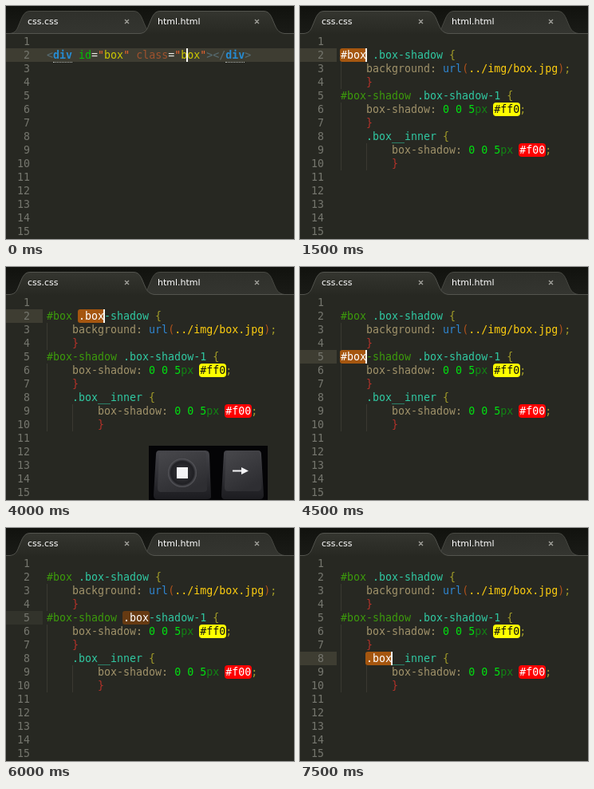
Animation of 361 by 292 pixels, one loop 8000 ms. Source, as an HTML page:

```html
<!DOCTYPE html>
<html lang="en">
<head>
<meta charset="utf-8">
<title>Multiple selection in an editor</title>
<style>
html, body { margin: 0; width: 100%; height: 100%; overflow: hidden; background: #272822; }
#stage { position: absolute; left: 0; top: 0; width: 361px; height: 292px; overflow: hidden; background: #272822; }
#stage > *, .guide, .line { position: absolute; }
svg { left: 0; top: 0; }
pre, #sel { font: 13.3px/17px "DejaVu Sans Mono", monospace; }
pre { margin: 0; top: 36px; }
#nums { left: 14px; color: #75766e; }
#html, #css { left: 51px; }
.label { top: 12px; font: 11px/15px "DejaVu Sans", sans-serif; color: #fff; }
#row, #sel, #caret { height: 17px; }
#row { left: 0; }
#sel { width: 34px; border-radius: 3px; color: #fff; text-indent: 1px; }
#caret { width: 2px; background: #f8f8f2; }
.guide { width: 1px; background: #3a3931; }
b { color: #268bd2; }
.line { height: 0; width: 24px; top: 70px; border-top: 1px dotted #b4b8b4; }
.tag { color: #586e75; }
.attr { color: #00c400; }
.cls { color: #a0522d; }
.eq { color: #e8e8e2; }
.q { color: #f0642d; }
.str { color: #cbc800; }
.id { color: #3c9a0c; }
.dot { color: #30c8a2; }
.open { color: #a09a28; }
.shut { color: #b5322a; }
.prop { color: #a0926a; }
.fn { color: #2f86d2; }
.par { color: #b0521c; }
.path { color: #fccc10; }
.num { color: #00e010; }
.unit { color: #128414; }
.yel, .red { border-radius: 4px; padding: 1px; margin: 0 -1px; }
.yel { background: #ff0; color: #111; }
.red { background: #f00; color: #fff; }
</style>
</head>
<body>
<div id="stage">
  <svg width="361" height="36">
    <defs>
      <linearGradient id="bar" x2="0" y2="1"><stop stop-color="#11120e"/><stop offset="1" stop-color="#1a1b17"/></linearGradient>
      <linearGradient id="off" x2="0" y2="1"><stop stop-color="#2f302b"/><stop offset="1" stop-color="#343530"/></linearGradient>
      <linearGradient id="on" x2="0" y2="1"><stop stop-color="#34352f"/><stop offset="1" stop-color="#272822"/></linearGradient>
    </defs>
    <rect width="361" height="35" fill="url(#bar)"/>
    <g id="tabs"></g>
  </svg>
  <div class="label" style="left:27px">css.css</div>
  <div class="label" style="left:190px">html.html</div>
  <svg width="361" height="36"><path d="M149 17l5 5m0-5l-5 5M312 17l5 5m0-5l-5 5" stroke="#a2a29c" stroke-width="1.3"/></svg>
  <div id="row"></div>
  <pre id="nums"></pre>
  <div id="guides"></div>
  <pre id="html"></pre>
  <div id="lines"></div>
  <pre id="css"></pre>
  <div id="sel"></div>
  <div id="caret"></div>
  <svg id="keys" width="361" height="292">
    <defs>
      <linearGradient id="side" x2="0" y2="1"><stop stop-color="#45454a"/><stop offset="1" stop-color="#1c1c20"/></linearGradient>
      <linearGradient id="face" x2=".5" y2="1"><stop stop-color="#48484c"/><stop offset="1" stop-color="#2e2e32"/></linearGradient>
      <radialGradient id="dish"><stop stop-color="#3a3a3e"/><stop offset=".8" stop-color="#202024"/><stop offset="1" stop-color="#59595e"/></radialGradient>
    </defs>
    <rect x="179" y="224" width="149" height="68" fill="#040406"/>
    <path d="M192 230H250Q255 230 255 236L257 288Q257 291 252 291H189Q185 291 185 286L188 235Q188 230 192 230Z" fill="url(#side)"/>
    <path d="M195 232H248Q251 232 251 236L252 278Q252 282 247 282H194Q190 282 190 277L192 236Q192 232 195 232Z" fill="url(#face)"/>
    <circle cx="221" cy="258" r="18" fill="url(#dish)"/>
    <rect x="214" y="251" width="14" height="14" fill="#f4f4f6"/>
    <path d="M277 230H316Q320 230 320 235L323 286Q323 291 318 291H274Q270 291 270 286L273 234Q273 230 277 230Z" fill="url(#side)"/>
    <path d="M279 231H315Q318 231 318 235L320 276Q320 281 315 281H278Q274 281 274 276L276 235Q276 231 279 231Z" fill="url(#face)"/>
    <path d="M284 254.500H295V251L304 255.500L295 260V256.500H284Z" fill="#f4f4f6"/>
  </svg>
</div>
<script>
const $ = id => document.getElementById(id);
const LEFT = 51, TOP = 36, CH = 8, ROW = 17, LOOP = 8000;
const colX = n => LEFT + n * CH;
const rowTop = n => TOP + (n - 1) * ROW;
const esc = s => s.replace(/&/g, "&amp;").replace(/</g, "&lt;");

// A line is an indent followed by pairs of class and text.
const line = ([indent, ...parts]) => {
  let out = " ".repeat(indent);
  for (let i = 0; i < parts.length; i += 2)
    out += parts[i] === "b" ? `<b>${parts[i + 1]}</b>` : `<span class="${parts[i]}">${esc(parts[i + 1])}</span>`;
  return out;
};
// Code begins on the second row.
const fill = (id, lines) => {
  $(id).innerHTML = lines.map(line).join("\n");
  $(id).style.top = rowTop(2) + "px";
};
const shadow = (indent, style, color) => [indent, "prop", "box-shadow: ", "num", "0 0 5", "unit", "px ", style, color, "open", ";"];

fill("html", [[0, "tag", "<", "b", "div", "attr", " id", "eq", "=", "q", '"', "str", "box", "q", '"',
  "cls", " class", "eq", "=", "q", '"', "str", "box", "q", '"', "tag", "></", "b", "div", "tag", ">"]]);
fill("css", [
  [0, "id", "#box ", "dot", ".box-shadow ", "open", "{"],
  [4, "prop", "background: ", "fn", "url", "par", "(", "path", "../img/box.jpg", "par", ")", "open", ";"],
  [4, "shut", "}"],
  [0, "id", "#box-shadow ", "dot", ".box-shadow-1 ", "open", "{"],
  shadow(4, "yel", "#ff0"),
  [4, "shut", "}"],
  [4, "dot", ".box__inner ", "open", "{"],
  shadow(8, "red", "#f00"),
  [8, "shut", "}"]
]);
$("nums").textContent = Array.from({ length: 15 }, (_, i) => String(i + 1).padStart(2)).join("\n");
$("lines").innerHTML = [1, 28].map(col => `<div class="line" style="left:${colX(col)}px"></div>`).join("");
$("lines").style.cssText = "left:0;top:0";

// Indent guides: column, first row, row count
$("guides").innerHTML = [[0, 3, 2], [0, 6, 5], [4, 9, 2]].map(([col, row, n]) =>
  `<div class="guide" style="left:${colX(col)}px;top:${rowTop(row)}px;height:${n * ROW}px"></div>`).join("");
$("guides").style.cssText = "left:0;top:0";

const tab = (x, active) => {
  const curve = "c8-1 9-6 12-13s5-15 13-15h130c8 0 10 8 13 15s5 12 13 13";
  return active
    ? `<path d="M${x} 34.5${curve}V36H${x}Z" fill="url(#on)"/><path d="M0 34.5H${x}${curve}H361" fill="none" stroke="#53544e"/>`
    : `<path d="M${x} 34.5${curve}Z" fill="url(#off)" stroke="#484943"/>`;
};

// start, row, column, selected text, dimmed
const steps = [
  [0, 2, 22, ""],
  [1500, 2, 0, "#box"],
  [3000, 2, 5, ".box"],
  [4500, 5, 0, "#box"],
  [6000, 5, 12, ".box", true],
  [7500, 8, 4, ".box"]
];
const show = (id, on) => { $(id).style.display = on ? "" : "none"; };
let last = "";

function draw(t) {
  const i = steps.findLastIndex(s => t >= s[0]);
  const [, row, col, text, dim] = steps[i];
  const next = steps[i + 1];
  const keys = !!next && t >= next[0] - 500;
  if (last === i + "," + keys) return;
  last = i + "," + keys;

  const html = i === 0, x = colX(col), y = rowTop(row) + "px";
  $("tabs").innerHTML = html ? tab(5) + tab(168, true) : tab(168) + tab(5, true);
  show("html", html);
  show("lines", html);
  show("css", !html);
  show("guides", !html);
  show("keys", keys);
  show("sel", !html);
  show("caret", !dim);
  for (const id of ["row", "sel", "caret"]) $(id).style.top = y;
  $("row").style.width = html ? "361px" : "46px";
  $("row").style.background = dim ? "#32332b" : "#3e3d32";
  $("sel").style.left = x - 1 + "px";
  $("sel").style.background = dim ? "#663a12" : "#a5560f";
  $("sel").textContent = text;
  $("caret").style.left = x + text.length * CH - 1 + "px";
}

function tick() {
  draw(performance.now() % LOOP);
  requestAnimationFrame(tick);
}
tick();
</script>
</body>
</html>
```
